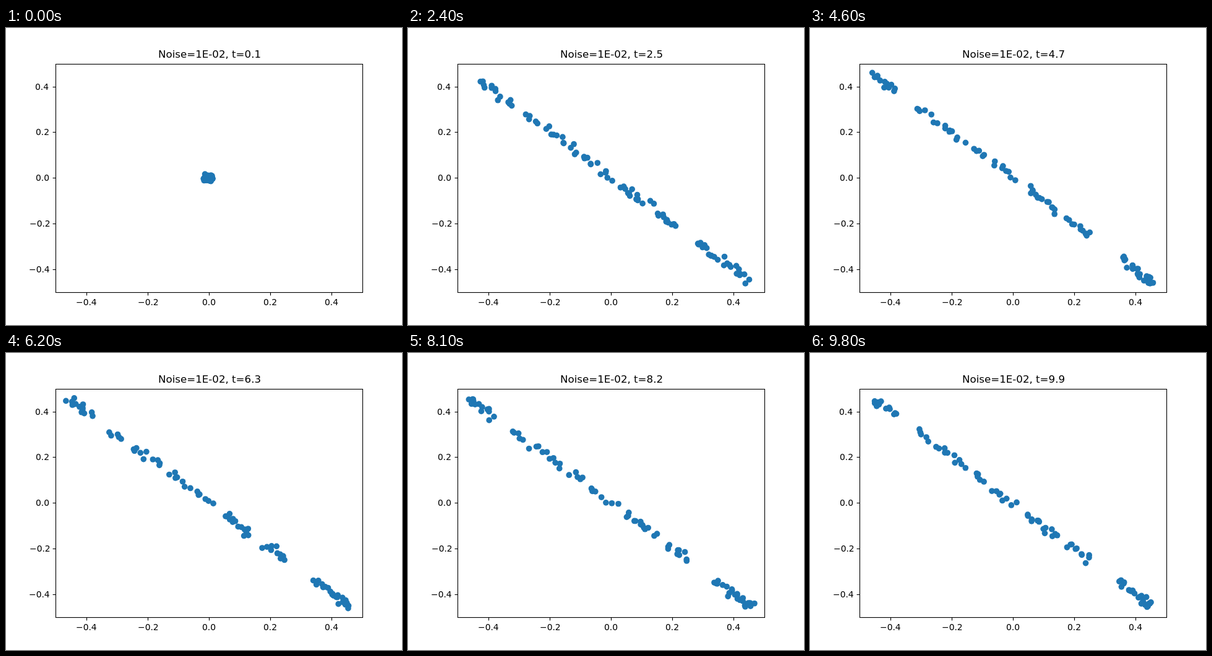
These frames come from a looping animation (640 px wide and 480 px high, 9.9 s). An HTML page with a canvas:

```html
<!DOCTYPE html>
<html lang="en">
<head>
<meta charset="utf-8">
<title>Noisy particles</title>
<style>
  html, body { margin: 0; width: 100%; height: 100%; overflow: hidden; background: #fff; }
  canvas { display: block; }
</style>
</head>
<body>
<canvas id="stage" width="640" height="480"></canvas>
<script>
const ctx = document.getElementById('stage').getContext('2d');
const STEPS = 99, STEP_MS = 100, NOISE = 0.0062;
const TICK_SIZE = 13.89, TITLE_SIZE = 16.67;

const px = v => 328 + 496 * v;
const py = v => 242.4 - 369.6 * v;
const snap = v => Math.floor(v + 0.5) + 0.5;
const clamp01 = v => Math.max(0, Math.min(1, v));
const smooth = v => v * v * (3 - 2 * v);

let seed = 20;
function random() {
  seed = (seed + 0x6d2b79f5) | 0;
  let h = Math.imul(seed ^ (seed >>> 15), 1 | seed);
  h = (h + Math.imul(h ^ (h >>> 7), 61 | h)) ^ h;
  return ((h ^ (h >>> 14)) >>> 0) / 4294967296;
}
function gauss() {
  let sum = -3;
  for (let i = 0; i < 6; i++) sum += random();
  return sum * Math.SQRT2;
}

// Evenly spread places; crowd > 1 packs them towards `from`.
const spread = (from, to, count, crowd = 1) =>
  Array.from({ length: count }, (_, i) => from + (to - from) * (i / (count - 1)) ** crowd);

// Where the particles come to rest along the falling diagonal.
const resting = [
  spread(-0.45, -0.38, 14, 1.5),
  spread(-0.315, -0.28, 5),
  spread(-0.25, -0.16, 10),
  spread(-0.125, -0.1, 5),
  spread(-0.07, 0.01, 8),
  spread(0.05, 0.14, 14),
  spread(0.18, 0.25, 10),
  spread(0.45, 0.34, 24, 1.5)
].flat().sort((a, b) => a - b);

// Exponential growth that saturates.
function growth(t) {
  const k = 1.07 * Math.exp(2.1 * (t - 1.7));
  return k / Math.sqrt(1 + k * k);
}

// The cloud opens centre-heavy, then settles into the resting groups.
function simulate() {
  const cloud = resting.map((rest, i) => {
    const z = 2 * i / (resting.length - 1) - 1;
    return { rest, early: 0.027 + 0.425 * (0.75 * z + 0.25 * z ** 3), dx: 0, dy: 0 };
  });
  return Array.from({ length: STEPS }, (_, n) => {
    const t = (n + 1) / 10, g = growth(t);
    const scale = g * clamp01((t - 0.1) / 0.6);
    const blend = smooth(clamp01((t - 1.7) / 1.4));
    const keep = 1.02 - 0.42 * g * g;
    return cloud.map(p => {
      p.dx = p.dx * keep + NOISE * gauss();
      p.dy = p.dy * keep + NOISE * gauss();
      const base = scale * (p.early + (p.rest - p.early) * blend);
      return [base + p.dx, -base + p.dy];
    });
  });
}
const poses = simulate();

function line(x1, y1, x2, y2) {
  ctx.beginPath();
  ctx.moveTo(x1, y1);
  ctx.lineTo(x2, y2);
  ctx.stroke();
}

// Places text by its ink width on whole pixels; align 0.5 centres, 1 ends at x.
function label(text, x, y, size, align) {
  ctx.font = `${size}px "DejaVu Sans", sans-serif`;
  const box = ctx.measureText(text);
  const ink = Math.ceil(box.actualBoundingBoxLeft + box.actualBoundingBoxRight);
  ctx.fillText(text, Math.round(x - ink * align), y);
}

function drawAxes() {
  ctx.strokeStyle = ctx.fillStyle = '#000';
  ctx.lineWidth = 1.11;
  ctx.strokeRect(80.5, 58.5, 496, 369);
  for (let i = -2; i <= 2; i++) {
    const v = i / 5, x = snap(px(v)), y = snap(py(v));
    const text = v.toFixed(1).replace('-', '\u2212');
    line(x, 427.5, x, 432.4);
    line(80.5, y, 75.6, y);
    label(text, px(v), 448, TICK_SIZE, 0.5);
    label(text, 70.28, Math.round(py(v)) + 5, TICK_SIZE, 1);
  }
}

function draw(n) {
  ctx.fillStyle = '#fff';
  ctx.fillRect(0, 0, 640, 480);
  ctx.fillStyle = '#1f77b4';
  for (const [x, y] of poses[n]) {
    ctx.beginPath();
    ctx.arc(px(x), py(y), 4.86, 0, 2 * Math.PI);
    ctx.fill();
  }
  drawAxes();
  label(`Noise=1E-02, t=${((n + 1) / 10).toFixed(1)}`, 328, 48, TITLE_SIZE, 0.5);
}

const start = performance.now();
function tick() {
  draw(Math.floor((performance.now() - start) / STEP_MS) % STEPS);
  requestAnimationFrame(tick);
}
tick();
</script>
</body>
</html>
```
